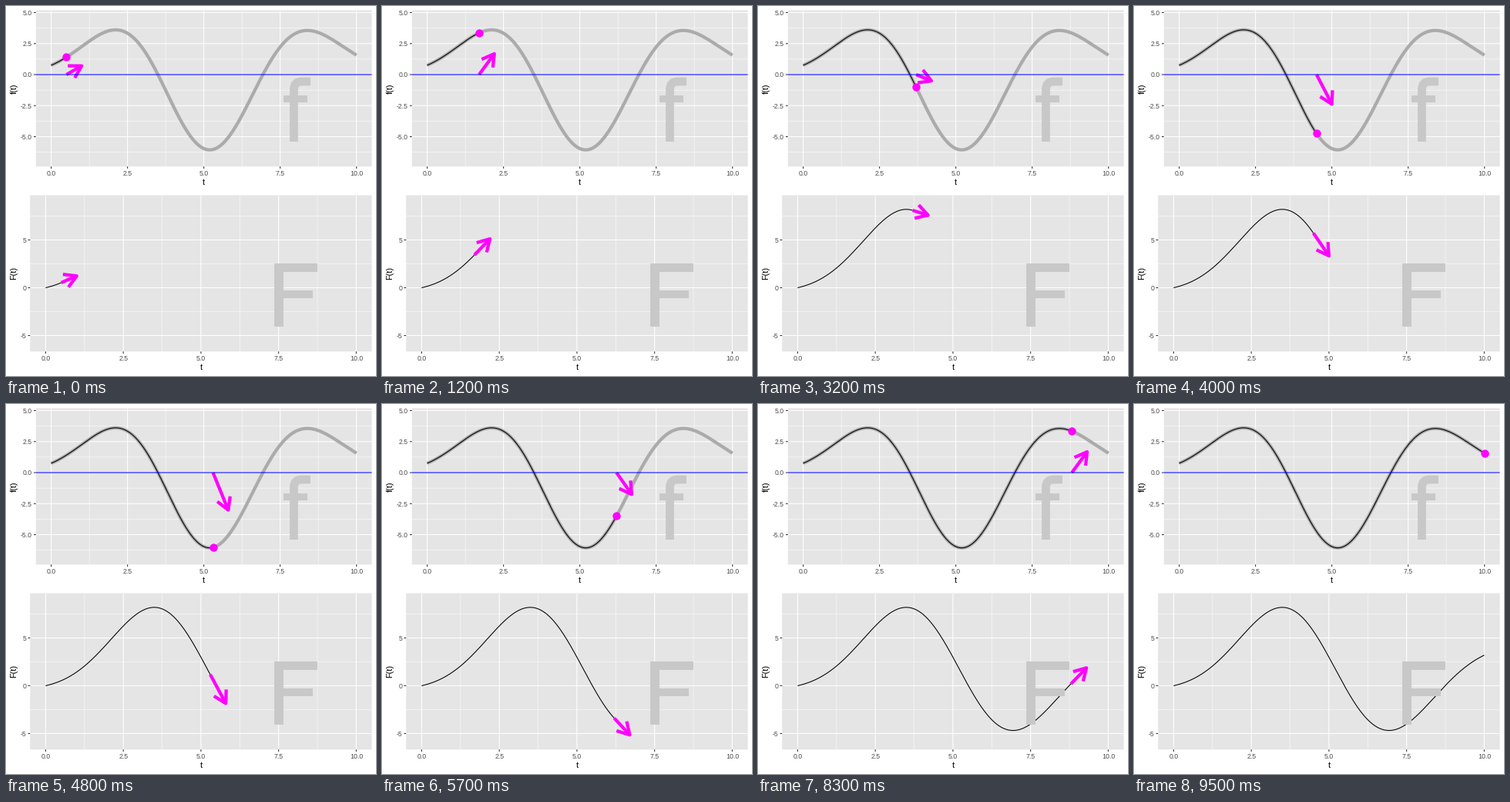
A matplotlib script for the animation above (9600 ms loop, 480x480 px).

```python
import numpy as np
import matplotlib.pyplot as plt
from matplotlib.animation import FuncAnimation
from matplotlib.patches import PathPatch
from matplotlib.path import Path
from matplotlib.ticker import FormatStrFormatter, MultipleLocator

SIZE = 480
FRAMES = 96
RIGHT = 474.5
TICK = 2.74
THIN, THICK = 1.07, 4.27
PINK, GLYPH = "#ff00ff", "#c8c8c8"
HEAD, HEAD_ANGLE = 18, np.radians(30)

plt.rcParams.update({
    "font.family": "Liberation Sans",
    "axes.unicode_minus": False,
    "path.snap": False,
})

# f is a polynomial under a bell curve, set by a few heights of f and of F
CENTRE, SPREAD, DEGREE = 5.23, 6.66, 6
F_LOW = [(0, 0.77), (0.5, 1.39), (2.12, 3.66), (2.9, 2.45), (3.49, 0), (4.5, -4.66),
         (5.24, -6.02), (7.2, 1.22), (8.33, 3.57), (8.8, 3.29), (10, 1.61)]
F_UP = [(3.49, 8.23), (6.94, -4.72), (10, 3.19)]

grid = np.linspace(0, 10, 1001)
u = grid - CENTRE
waves = np.vander(u / 3, DEGREE + 1) * np.exp(-u ** 2 / SPREAD)[:, None]
steps = (waves[1:] + waves[:-1]) / 2 * (grid[1] - grid[0])
areas = np.vstack([np.zeros(DEGREE + 1), np.cumsum(steps, axis=0)])


def rows_at(table, points):
    return table[[round(t * 100) for t, _ in points]]


rows = np.vstack([rows_at(waves, F_LOW), rows_at(areas, F_UP)])
heights = [y for _, y in F_LOW + F_UP]
weights = np.linalg.lstsq(rows, heights, rcond=None)[0]


def f(t):
    return np.interp(t, grid, waves @ weights)


def F(t):
    return np.interp(t, grid, areas @ weights)


fig = plt.figure(figsize=(SIZE / 72, SIZE / 72), dpi=72, facecolor="white")

# Overlay in pixel coordinates, y downwards
stage = fig.add_axes([0, 0, 1, 1], zorder=2)
stage.set_xlim(0, SIZE)
stage.set_ylim(SIZE, 0)
stage.axis("off")


def stroke(xs, ys, color, width, zorder=2):
    return stage.plot(xs, ys, color=color, lw=width, solid_capstyle="butt",
                      solid_joinstyle="round", zorder=zorder)[0]


def make_panel(left, top, zero, unit, step, label_format, name):
    """Grey panel given in pixels; zero is the pixel row of y = 0."""
    bottom = top + 202.7
    ax = fig.add_axes([left / SIZE, 1 - bottom / SIZE,
                       (RIGHT - left) / SIZE, (bottom - top) / SIZE])
    ax.set_facecolor("#e5e5e5")
    ax.set_xlim(-0.5, 10.5)
    ax.set_ylim((zero - bottom) / unit, (zero - top) / unit)
    for axis, gap, fmt in ((ax.xaxis, 2.5, "%.1f"), (ax.yaxis, step, label_format)):
        axis.set_major_locator(MultipleLocator(gap))
        axis.set_minor_locator(MultipleLocator(gap / 2))
        axis.set_major_formatter(FormatStrFormatter(fmt))
    ax.set_axisbelow(True)
    ax.grid(which="major", color="white", lw=THIN)
    ax.grid(which="minor", color="white", lw=THIN / 2)
    ax.tick_params(which="both", length=0)
    ax.tick_params(pad=TICK + 2.2, labelcolor="#4d4d4d", labelsize=8.8)
    for spine in ax.spines.values():
        spine.set_visible(False)

    def to_px(x, y):
        return np.array([left + (x + 0.5) * (RIGHT - left) / 11, zero - y * unit])

    for x in np.arange(0, 10.1, 2.5):
        px = to_px(x, 0)[0]
        stroke([px, px], [bottom, bottom + TICK], "#333333", THIN)
    for y in np.arange(-5, 5.1, step):
        py = to_px(0, y)[1]
        stroke([left - TICK, left], [py, py], "#333333", THIN)

    stage.text((left + RIGHT) / 2, bottom + 21.3, "t", size=11, ha="center", va="center")
    stage.text(10.5, (top + bottom) / 2, name, size=11, rotation=90,
               ha="center", va="center")
    return ax, to_px


upper, upper_px = make_panel(38.8, 5.5, 89, 16.1, 2.5, "%.1f", "f(t)")
lower, lower_px = make_panel(31.3, 245.5, 365.5, 12.4, 5, "%d", "F(t)")

# Big letters built from strokes
stroke([354, 354], [334, 416], GLYPH, 12, zorder=5)
stroke([348, 404], [339.5, 339.5], GLYPH, 11, zorder=5)
stroke([348, 398], [374, 374], GLYPH, 10, zorder=5)
stroke([360, 391], [120.5, 120.5], GLYPH, 9, zorder=5)
hook = Path([(373.5, 176), (373.5, 108), (373.5, 98), (383, 98), (395, 98)],
            [Path.MOVETO, Path.LINETO, Path.CURVE3, Path.CURVE3, Path.LINETO])
stage.add_patch(PathPatch(hook, fc="none", ec=GLYPH, lw=10.7,
                          capstyle="butt", zorder=5))

upper.plot(grid, f(grid), color="#ababab", lw=THICK, solid_capstyle="butt")
upper_trace, = upper.plot([], [], color="black", lw=THIN, solid_capstyle="butt")
lower_trace, = lower.plot([], [], color="black", lw=THIN, solid_capstyle="butt")
dot, = upper.plot([], [], "o", color=PINK, ms=10.4, mew=0, zorder=4)


def make_arrow():
    return [stroke([], [], PINK, THICK) for _ in range(2)]


def set_arrow(arrow, tail, tip, visible):
    shaft, head = arrow
    back = np.arctan2(*(tail - tip)[::-1])
    barbs = [tip + HEAD * np.array([np.cos(back + a), np.sin(back + a)])
             for a in (-HEAD_ANGLE, HEAD_ANGLE)]
    shaft.set_data(*np.transpose([tail, tip]))
    head.set_data(*np.transpose([barbs[0], tip, barbs[1]]))
    for part in arrow:
        part.set_visible(visible)


upper_arrow, lower_arrow = make_arrow(), make_arrow()
stroke([38.8, RIGHT], [89, 89], "blue", THIN, zorder=3)


def update(i):
    t = 0.5 + i / 10
    past = np.linspace(0, t, 300)
    upper_trace.set_data(past, f(past))
    lower_trace.set_data(past, F(past))
    dot.set_data([t], [f(t)])
    end, rise = t + 0.5, f(t) / 2
    inside = end < 10.01
    set_arrow(upper_arrow, upper_px(t, 0), upper_px(end, rise), inside)
    set_arrow(lower_arrow, lower_px(t, F(t)), lower_px(end, F(t) + rise), inside)
    return [upper_trace, lower_trace, dot, *upper_arrow, *lower_arrow]


anim = FuncAnimation(fig, update, frames=FRAMES, interval=100,
                     repeat=True, repeat_delay=0, blit=False)
plt.show()
```
